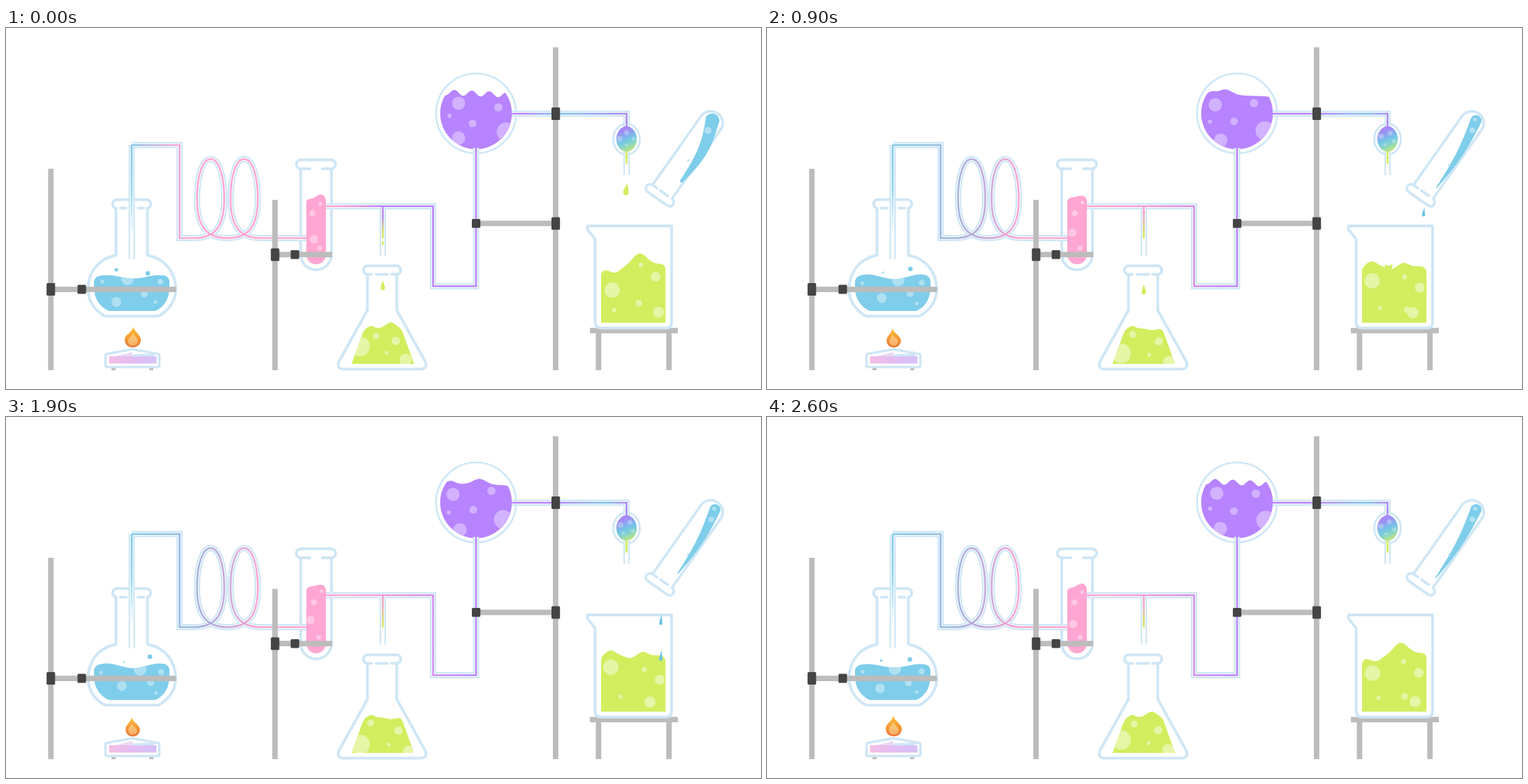
Write an HTML page with a canvas that moves like this. It is 1081 px wide and 518 px high and loops after 2.7 s.

```html
<!DOCTYPE html>
<html lang="en">
<head>
<meta charset="utf-8">
<title>Laboratory</title>
<style>
html, body { margin: 0; width: 100%; height: 100%; overflow: hidden; background: #fff; }
canvas { display: block; }
</style>
</head>
<body>
<canvas id="stage" width="1081" height="518"></canvas>
<script>
const g = document.getElementById('stage').getContext('2d');
const LOOP = 2700, STEP = 100, TAU = 2 * Math.PI;
const GLASS = '#cfe6f5', ROD = '#bcbcbc', CLAMP = '#444';
const BLUE = '#7ecdea', PINK = '#ffa6d2', PURPLE = '#b783ff', GREEN = '#d2ed5e', ORCHID = '#a88af5';

const lerp = (a, b, k) => a + (b - a) * k;
const P = d => new Path2D(d);
const bell = (x, mid, width) => Math.exp(-(((x - mid) / width) ** 2));

function ease(from, to, t) {
  const k = Math.min(1, Math.max(0, (t - from) / (to - from)));
  return k * k * (3 - 2 * k);
}
function mix(a, b, k) {
  const part = (c, i) => parseInt(c.substr(i, 2), 16);
  return 'rgb(' + [1, 3, 5].map(i => Math.round(lerp(part(a, i), part(b, i), k))) + ')';
}
const lighten = (c, k) => mix(c, '#ffffff', k);

function stroke(path, color, width) {
  g.strokeStyle = color;
  g.lineWidth = width;
  g.stroke(path);
}
function rect(color, x, y, w, h) {
  g.fillStyle = color;
  g.fillRect(x, y, w, h);
}
// Clamp centred on a point; big ones hold a rod, small ones an arm
function clamp(x, y, big) {
  const h = big ? 18 : 12.8;
  g.fillStyle = CLAMP;
  g.beginPath();
  g.roundRect(x - 6.1, y - h / 2, 12.2, h, 1.5);
  g.fill();
}
function dot(x, y, r, color) {
  g.fillStyle = color;
  g.beginPath();
  g.arc(x, y, r, 0, TAU);
  g.fill();
}
function oval(x, y, rx, ry) {
  const p = new Path2D();
  p.ellipse(x, y, rx, ry, 0, 0, TAU);
  return p;
}
function gradient(x0, y0, x1, y1, ...stops) {
  const gr = g.createLinearGradient(x0, y0, x1, y1);
  for (const [p, c] of stops) gr.addColorStop(p, c);
  return gr;
}

// wave(x, surge, t): height of the surface; surge is 1 when stirred up, 0 when calm
// bubbles: x, y, radius and the drift made while the liquid turns over
const LIQUIDS = [
  { color: BLUE, left: 126, right: 234,
    shape: P('M126 340V372C126 388 134 400 147 406H214C227 400 234 388 234 372V340Z'),
    wave: (x, surge) => 357 - (3.4 - surge) * Math.cos(TAU * (x - 144) / 76),
    bubbles: [[158, 393, 7, 8, -7], [138, 364, 2.7, -2, 3], [174, 360, 9, 18, 2],
      [198, 382, 5, 9, -1], [221, 364, 4.3, 1, 2], [214, 393, 2.6, 1, 3]] },
  { color: PINK, left: 430, right: 458,
    shape: P('M430 220V325A14 14 0 0 0 458 325V220Z'),
    wave: (x, surge) => 241.5 + lerp(1.2, 3, surge) * Math.cos(TAU * (x - 436) / 32),
    bubbles: [[439, 266, 4.4, 2, 0], [450, 252, 2.7, 2, -2], [441, 303, 6, -5, -12], [449, 316, 3.5, -1, 0]] },
  { color: PURPLE, left: 622, right: 724,
    shape: oval(673, 122.5, 51.3, 51.3),
    wave(x, surge, t) {
      const tilt = (x - 622) / 25, roll = lerp(640, 678, ease(400, 1500, t));
      const calm = 95 + tilt * .8 - 8 * bell(x, roll, 13) - 4 * bell(x, 637, 8);
      return lerp(calm, 92 + tilt - 4 * Math.cos(TAU * (x - 642) / 25), surge);
    },
    bubbles: [[648, 108, 9.5, -8, 3], [635, 126, 3, -1, 11], [705, 114, 6, -10, -8],
      [668, 137, 5.5, 1, -4], [648, 158, 9.7, 2, 4], [716, 149, 13.5, -4, -2]] },
  { color: GREEN, left: 511, right: 568,
    shape: P('M484.5 482L519 424V400H561V422L593.5 482Z'),
    wave: (x, surge) => 431 - 3.5 * bell(x, 523, 6) + 2.5 * bell(x, 551, 9) - surge * 11 * bell(x, 551, 10),
    bubbles: [[507, 457, 14, 0, 13], [530, 442, 5, -8, -3], [558, 449, 6, 4, 1],
      [545, 466, 2.8, 3, 4], [572, 476, 8.7, 5, 4]] },
  { color: GREEN, left: 852, right: 944,
    shape: P('M852 300H944.3V422.7H852Z'),
    wave(x, surge) {
      const calm = 342 - 7 * bell(x, 866, 10) + 4 * bell(x, 893, 9) - 5 * bell(x, 912, 9);
      return lerp(calm, 347 - (x - 852) / 10 - 18 * bell(x, 907, 15) + 6 * bell(x, 872, 10), surge);
    },
    bubbles: [[868, 376, 11, -2, -17], [909, 340, 3.6, 5, 22], [930, 357, 7, 6, 20],
      [906, 395, 4.8, 14, 12], [934, 408, 8, -12, 1], [871, 405, 3, 9, -4]] }
];

function liquid(q, t, surge, turn) {
  g.save();
  g.clip(q.shape);
  g.beginPath();
  g.moveTo(q.left - 30, 520);
  for (let x = q.left; x <= q.right; x++) {
    const edge = Math.min(x - q.left, q.right - x);
    g.lineTo(x, q.wave(x, surge, t) + 6 * Math.exp(-edge / 2.5));
  }
  g.lineTo(q.right + 30, 520);
  g.fillStyle = q.color;
  g.fill();
  g.clip();
  const tint = lighten(q.color, q.color === GREEN ? .45 : .37);
  for (const [x, y, r, dx, dy] of q.bubbles) dot(x + dx * turn, y + dy * turn, r, tint);
  g.restore();
}

// Teardrop with its tip at the top
function drop(x, y, w, h, color, lean = 0) {
  const top = y - h / 2, low = y + h / 2, r = w / 2;
  g.fillStyle = color;
  g.beginPath();
  g.moveTo(x + lean, top);
  g.bezierCurveTo(x + lean * .5 + r * .3, top + h * .3, x + r, low - w, x + r, low - r);
  g.bezierCurveTo(x + r, low + r * .3, x - r, low + r * .3, x - r, low - r);
  g.bezierCurveTo(x - r, low - w, x + lean * .5 - r * .3, top + h * .3, x + lean, top);
  g.fill();
}

// One turn of the coil around x = mid, entering and leaving along y = 301.5
const turnAt = mid => `H${mid - 24}C${mid + 7} 301.5 ${mid + 19.5} 284 ${mid + 19.5} 245` +
  `C${mid + 19.5} 210 ${mid + 11} 188 ${mid} 188C${mid - 11} 188 ${mid - 19.5} 210 ${mid - 19.5} 245` +
  `C${mid - 19.5} 284 ${mid - 7} 301.5 ${mid + 24} 301.5`;

const COIL = P('M180 168H248.5V301.5' + turnAt(293) + turnAt(341) + 'H430');
const RISER = P('M180 331.5V168');
const BEND = P('M458 255.7H611.5V370.5H673V172');
const BRANCH = P('M539.5 257V326.5');
const FEED = P('M724 123H888.5V142');
const OUTLET = P('M888.5 179V211');

function casing(...paths) {
  for (const p of paths) stroke(p, GLASS, 9);
  for (const p of paths) stroke(p, '#fff', 4.6);
}

function pipes(flow) {
  g.lineJoin = 'miter';
  g.lineCap = 'butt';
  casing(RISER, COIL);
  casing(BRANCH, BEND);
  casing(FEED, OUTLET);
  stroke(P('M180 300V168'), gradient(0, 168, 0, 300, [0, '#7cc8e6'], [.45, '#8bd2ec'], [1, '#ffffff']), 2.6);
  stroke(COIL, gradient(180, 0, 375, 0, [0, '#7cc8e6'], [lerp(.1, .36, flow), mix('#a9b9df', '#93b9df', flow)],
    [lerp(.33, .66, flow), mix('#f2a5d4', '#c0a9da', flow)], [lerp(.5, .95, flow), PINK]), 2.6);
  stroke(BEND, gradient(458, 0, 673, 0, [0, PINK], [lerp(.12, .35, flow), '#f49dd7'],
    [lerp(.38, .98, flow), PURPLE]), 2.6);
  stroke(P('M539.5 255V302'), gradient(0, 255, 0, 302, [0, mix(PURPLE, '#f49bd7', flow)],
    [.35, mix('#b98af0', '#f0a9c0', flow)], [.75, '#d9d672'], [1, GREEN]), 2.6);
  stroke(FEED, gradient(724, 0, 888, 0, [lerp(.1, .38, flow), PURPLE], [lerp(.42, .82, flow), '#7cc4ea'], [1, ORCHID]), 2.6);
  stroke(P('M888.5 176V194.5'), GREEN, 2.8);
}

const ROUND = P('M157.5 326V258.5A6.2 6.2 0 0 1 158 246.3H201.5A6.2 6.2 0 0 1 202.5 258.5V326' +
  'C228 331 243 351 243 375C243 392 233 404 221 412Q219 413.5 215 413.5H145Q141 413.5 139 412' +
  'C127 404 117.5 392 117.5 375C117.5 351 132 331 157.5 326M164 258.5H172M189 258.5H197');
const TUBE = P('M422 202A6.3 6.3 0 0 1 422 189.2H465A6.3 6.3 0 0 1 466 202V251' +
  'M466 260V325A22 22 0 0 1 422 325V306M422 297V202H435M453 202H464');
const CONE = P('M517.5 353.5A6.2 6.2 0 0 1 517 341.2H560A6.2 6.2 0 0 1 559.5 353.5V405L600.5 479' +
  'Q604 489.5 593 489.5H484Q473 489.5 476.5 479L517.5 405V353.5H523M530 353.5H546M552 353.5H559');
const BEAKER = P('M953 284H833Q831 288 834 291L843.5 303V422Q843.5 430.5 852 430.5H945Q953 430.5 953 422V284');
const TILTED = P('M6 -17H128.4A17.2 17.2 0 0 1 128.4 17.2H6A6 6 0 0 1 -6 17.2V-17A6 6 0 0 1 6 -17' +
  'M6 -17V-9M6 -3V10');

function glassware() {
  g.fillStyle = '#fff';
  g.fill(BEAKER);
  g.lineJoin = g.lineCap = 'round';
  for (const v of [ROUND, TUBE, CONE, BEAKER]) stroke(v, GLASS, 4);
  stroke(oval(673, 122.5, 57.3, 57.3), GLASS, 2.6);
  g.save();
  g.translate(936, 240);
  g.rotate(Math.atan2(-105, 74));
  stroke(TILTED, GLASS, 3.8);
  g.restore();
}

function flame(tip, top, r, low, fill) {
  const x = 181.5, mid = low - r, h = mid - top;
  g.fillStyle = fill;
  g.beginPath();
  g.moveTo(tip, top);
  g.bezierCurveTo(tip + 1.5, top + h * .4, x + r, mid - h * .35, x + r, mid);
  g.bezierCurveTo(x + r, low + r * .3, x - r, low + r * .3, x - r, mid);
  g.bezierCurveTo(x - r, mid - h * .4, tip - 1.5, top + h * .5, tip, top);
  g.fill();
}

function burner(t, surge) {
  rect(ROD, 151, 486, 6, 5);
  rect(ROD, 205, 486, 6, 5);
  rect(gradient(147, 0, 216, 0, [0, '#f4bfe3'], [.5, '#e4bcf2'], [1, '#d5c2f8']), 147.5, 471, 68, 10.5);
  g.fillStyle = '#ead9f4';
  g.fill(P('M156 471L181 465V471Z'));
  stroke(P('M142.5 470V484Q142.5 486.5 145 486.5H217Q219.5 486.5 219.5 484V470Q219.5 468 217 467.5' +
    'L181 461L145 467.5Q142.5 468 142.5 470ZM183 470L211 469'), GLASS, 3.6);

  const tip = 181 + 1.5 * Math.cos(TAU * (t - 600) / (LOOP / 5));
  const r = lerp(10.3, 11.6, surge), top = lerp(430.7, 428.5, surge);
  flame(tip, top, r, 458.5, gradient(0, 429, 0, 459, [0, '#f9c22e'], [.45, '#f5a138'], [1, '#ec7434']));
  flame(tip, top + 9, r * .6, 456, gradient(0, 437, 0, 457, [0, '#fbd07a'], [1, '#f7ad68']));
}

// Blue stream: a bowed spine from the closed end to the mouth, tapering on the way
function stream(t, flow) {
  const sway = 7 * flow * Math.cos(TAU * (t - 600) / 1800);
  const head = { x: lerp(1011, 1015, flow), y: 133, w: lerp(10.5, 8, flow) };
  const tail = { x: lerp(962, 957, flow) - sway * .7, y: lerp(226, 231, flow) + sway };
  const nx = .82, ny = .57, sides = [[], []];
  for (let u = 0; u <= 1; u += .05) {
    const x = lerp(head.x, tail.x, u) + lerp(9, 5, flow) * Math.sin(Math.PI * u);
    const y = lerp(head.y, tail.y, u);
    const w = head.w * (1 - u) ** lerp(.6, .85, flow);
    sides[0].push([x - w * nx, y - w * ny]);
    sides[1].unshift([x + w * nx, y + w * ny]);
  }
  g.fillStyle = BLUE;
  g.beginPath();
  for (const p of sides.flat()) g.lineTo(...p);
  const start = Math.atan2(ny, nx);
  g.arc(head.x, head.y, head.w, start, start - Math.PI, true);
  g.fill();
  const tint = lighten(BLUE, .4);
  dot(lerp(1005, 1010, flow), 147, lerp(5, 4, flow), tint);
  dot(1014, 131.5, 2.8 * flow, tint);
  dot(977, lerp(190, 197, flow), 1.8, tint);
}

function bulb(turn) {
  const shell = oval(888.5, 159.5, 19, 22);
  g.fillStyle = '#fff';
  g.fill(shell);
  stroke(shell, GLASS, 2.8);
  casing(P('M888.5 136V142'), P('M888.5 177V184'));
  stroke(P('M888.5 134V146'), ORCHID, 2.6);
  stroke(P('M888.5 174V186'), GREEN, 2.8);
  g.save();
  g.clip(oval(888.5, 159.3, 14.6, 18.2));
  rect(gradient(881, 141, 897, 178, [0, '#b07ffb'], [.2, '#9d90f3'], [.5, '#75c4e8'], [.68, '#83d3cd'], [1, '#cfeb60']),
    870, 138, 40, 42);
  for (let i = 0; i < 4; i++) {
    const a = Math.PI + i * TAU / 4 + turn * .5;
    dot(888.5 + 10 * Math.cos(a), 159 + 9 * Math.sin(a), 4 - i * .6, 'rgba(255,255,255,.28)');
  }
  g.restore();
}

function stands() {
  rect(ROD, 60.3, 202, 7.8, 289);
  rect(ROD, 68, 371.2, 175.5, 7.8);
  clamp(64.2, 375, true);
  clamp(108.5, 375);
  rect(ROD, 381.2, 246.7, 7.8, 244.3);
  rect(ROD, 389, 321.2, 78, 7.8);
  clamp(385.3, 325.2, true);
  clamp(413.7, 325.2);
  rect(ROD, 783, 27.7, 7.8, 463.3);
  rect(ROD, 676, 276.5, 110, 7.8);
  clamp(673.1, 280.4);
  clamp(787.1, 123, true);
  clamp(787.1, 280.5, true);
}

function table() {
  for (const x of [844.5, 945.3]) rect(ROD, x, 436, 7.8, 55);
  rect(ROD, 836, 430.3, 126, 7.8);
}

function splash(x, y, size, k) {
  const h = size * 1.6 * Math.sin(Math.PI * (.25 + .75 * k));
  drop(x, y - h / 2 + 4, size, h + 8, GREEN);
  for (const i of [-2, -1, 1, 2]) {
    const lift = size * Math.sin(Math.PI * k) * (1.1 - Math.abs(i) * .2);
    dot(x + i * size * (.25 + k * .4), y - lift, size * .12, GREEN);
  }
}

function drips(t) {
  const s = t / 1000;
  // into the conical flask
  for (const start of [-.476, 0, .4]) {
    const age = s - start, y = 310 + 260 * age * age;
    if (age < -.08 || age > .85) continue;
    if (age > .66) splash(539.5, 430, 10, (age - .66) / .19);
    else if (y < 334) drop(539.5, y - 2, 3.4, 7, GREEN);
    else drop(539.5, y, 6.4, 15, GREEN);
  }
  // from the bulb
  const y = 231 + 144 * s * s, fall = Math.min(1, s * 2);
  if (y < 338) drop(lerp(887.5, 890, fall), y, 8, 18, GREEN, 2.5 * (1 - fall));
  else if (s < 1.35) {
    const h = 24 * Math.sin((s - .86) / .49 * Math.PI);
    drop(890, 347 - h / 2, 11, h, GREEN);
  }
  // from the tilted tube
  for (const start of [.72, 1.38]) {
    const age = s - start, by = 250 + 78 * age, grow = Math.min(1, age * 3);
    if (age > .05 && by < 343) drop(lerp(943, 937.5, grow), by, 4.6, lerp(10, 16, grow), '#6cc3e4', 1.3);
  }
}

function draw(t) {
  const flow = ease(0, 400, t);
  const turn = ease(0, 1300, t) - ease(2250, 2950, t);
  const surge = 1 - ease(0, 550, t) + ease(2200, 2650, t);
  rect('#fff', 0, 0, 1081, 518);
  table();
  glassware();
  burner(t, surge);
  for (const q of LIQUIDS) liquid(q, t, surge, turn);
  pipes(flow);
  bulb(turn);
  stream(t, flow);
  dot(203 + 3 * turn, 352 - 8 * turn, 3.3, BLUE);
  dot(158 + 11 * turn, 347 + 5 * turn, 2.5 - 1.5 * turn, BLUE);
  drips(t);
  stands();
}

function tick() {
  const t = performance.now() % LOOP;
  draw(Math.floor(t / STEP) * STEP);
  requestAnimationFrame(tick);
}
tick();
</script>
</body>
</html>
```
